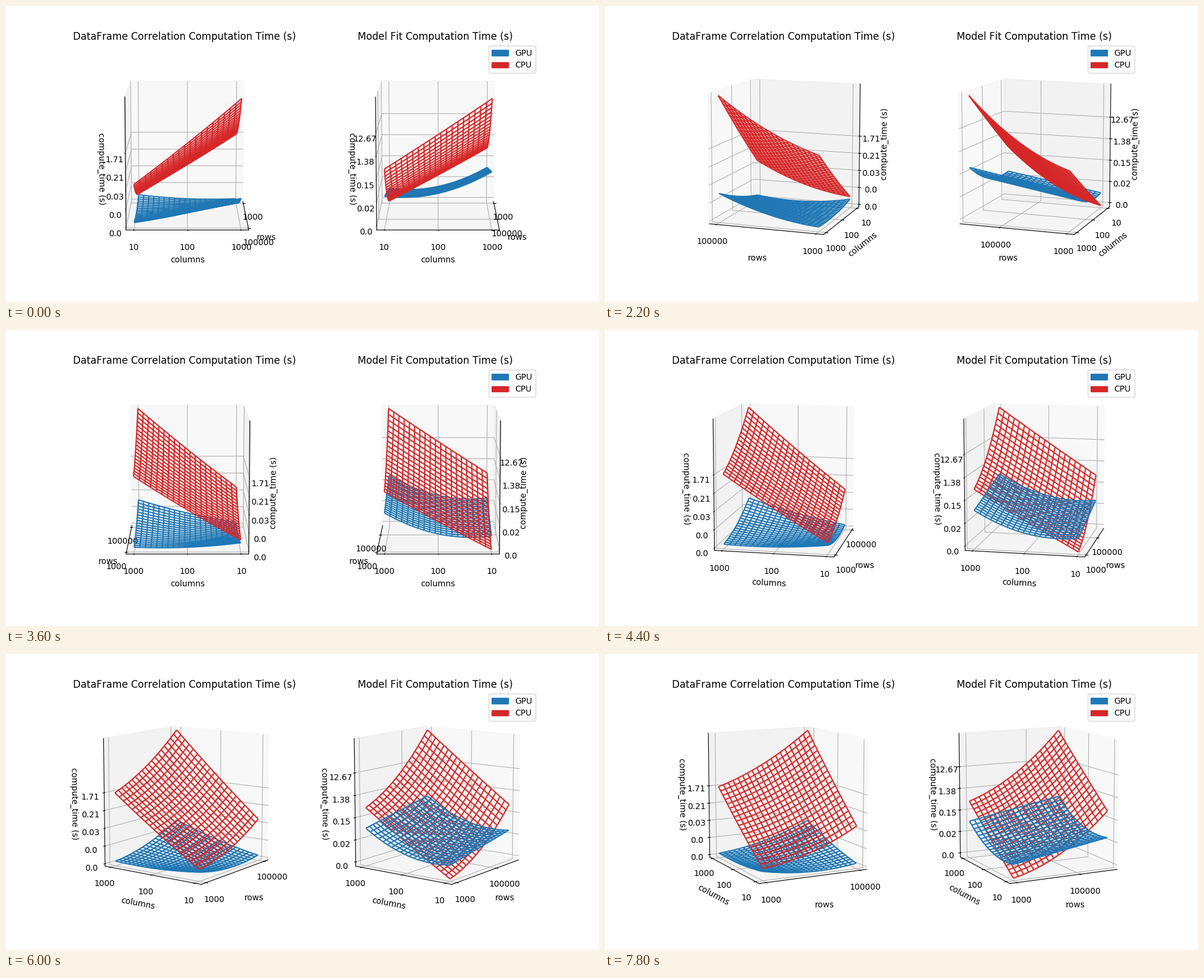
These frames come from a looping animation (1000 px wide and 500 px high, 8000 ms). A matplotlib script:

```python
import numpy as np
import matplotlib.pyplot as plt
from matplotlib.animation import FuncAnimation
from matplotlib.patches import Patch

plt.rcParams["text.kerning_factor"] = 6

FRAMES, INTERVAL = 40, 200
BLUE, RED = "tab:blue", "tab:red"

# The plotted box is a unit cube around the origin; data leave a margin in x and y.
EDGE = 1 / 2.2
LIMIT = 0.5 + 1 / 48
CUBE_ZOOM = 3 ** 0.5 / 1.8294640721620434

U, V = np.meshgrid(np.linspace(-1, 1, 20), np.linspace(-1, 1, 20), indexing="ij")


def surface(ll, hl, lh, hh, sag_u, sag_v):
    """Bilinear patch through four corners (rows, columns), sagging in between."""
    low = ll + (hl - ll) * (U + 1) / 2
    high = lh + (hh - lh) * (U + 1) / 2
    flat = low + (high - low) * (V + 1) / 2
    return flat - sag_u * (1 - U ** 2) - sag_v * (1 - V ** 2)


def add_panel(fig, slot, title, gpu, cpu, mid_row, z_ticks, z_labels):
    ax = fig.add_subplot(1, 2, slot, projection="3d")
    # Fill the whole subplot instead of shrinking to a square.
    ax.apply_aspect = lambda position=None: None
    ax.set_box_aspect((1, 1, 1), zoom=CUBE_ZOOM)
    for z, color in ((gpu, BLUE), (cpu, RED)):
        ax.plot_wireframe(U * EDGE, V * EDGE, z, color=color)

    ax.set_xlim(-LIMIT, LIMIT)
    ax.set_ylim(-LIMIT, LIMIT)
    ax.set_zlim(-LIMIT, LIMIT)
    ax.set_xticks([-EDGE, mid_row], ["1000", "100000"])
    ax.set_yticks([-EDGE, 0, EDGE], ["10", "100", "1000"])
    ax.set_zticks(z_ticks, z_labels)
    ax.set_xlabel("rows")
    ax.set_ylabel("columns")
    ax.set_zlabel("compute_time (s)")

    box = ax.get_position()
    fig.text((box.x0 + box.x1) / 2, 1 - 57 / 500, title, size=12,
             ha="center", va="baseline")
    return ax


fig = plt.figure(figsize=(10, 5), dpi=100)
steps = np.arange(5)

left = add_panel(
    fig, 1, "DataFrame Correlation Computation Time (s)",
    gpu=surface(-0.447, -0.477, -0.482, -0.283, 0.036, 0.018),
    cpu=surface(-0.424, -0.173, 0.08, 0.5, 0.045, 0.012),
    mid_row=EDGE,
    z_ticks=-0.5 + 0.1457 * steps,
    z_labels=["0.0", "0.0", "0.03", "0.21", "1.71"],
)
right = add_panel(
    fig, 2, "Model Fit Computation Time (s)",
    gpu=surface(-0.392, -0.267, -0.21, -0.073, 0, 0.074),
    cpu=surface(-0.5, -0.051, -0.041, 0.5, 0.073, 0.005),
    mid_row=EDGE / 3,
    z_ticks=-0.485 + 0.182 * steps,
    z_labels=["0.0", "0.02", "0.15", "1.38", "12.67"],
)
right.legend(handles=[Patch(color=BLUE, label="GPU"), Patch(color=RED, label="CPU")],
             loc="upper right")


def azimuth(n):
    """Fast half turn, then a slow one; the nudge settles head-on views."""
    if n <= 18:
        return max(0.001, 10 * n - 0.001)
    return 180 + 3 * (n - 18)


def update(n):
    for ax in (left, right):
        ax.view_init(elev=10, azim=azimuth(n))
    return []


anim = FuncAnimation(fig, update, frames=FRAMES, interval=INTERVAL,
                     init_func=lambda: update(0), repeat=True, repeat_delay=0)
plt.show()
```
